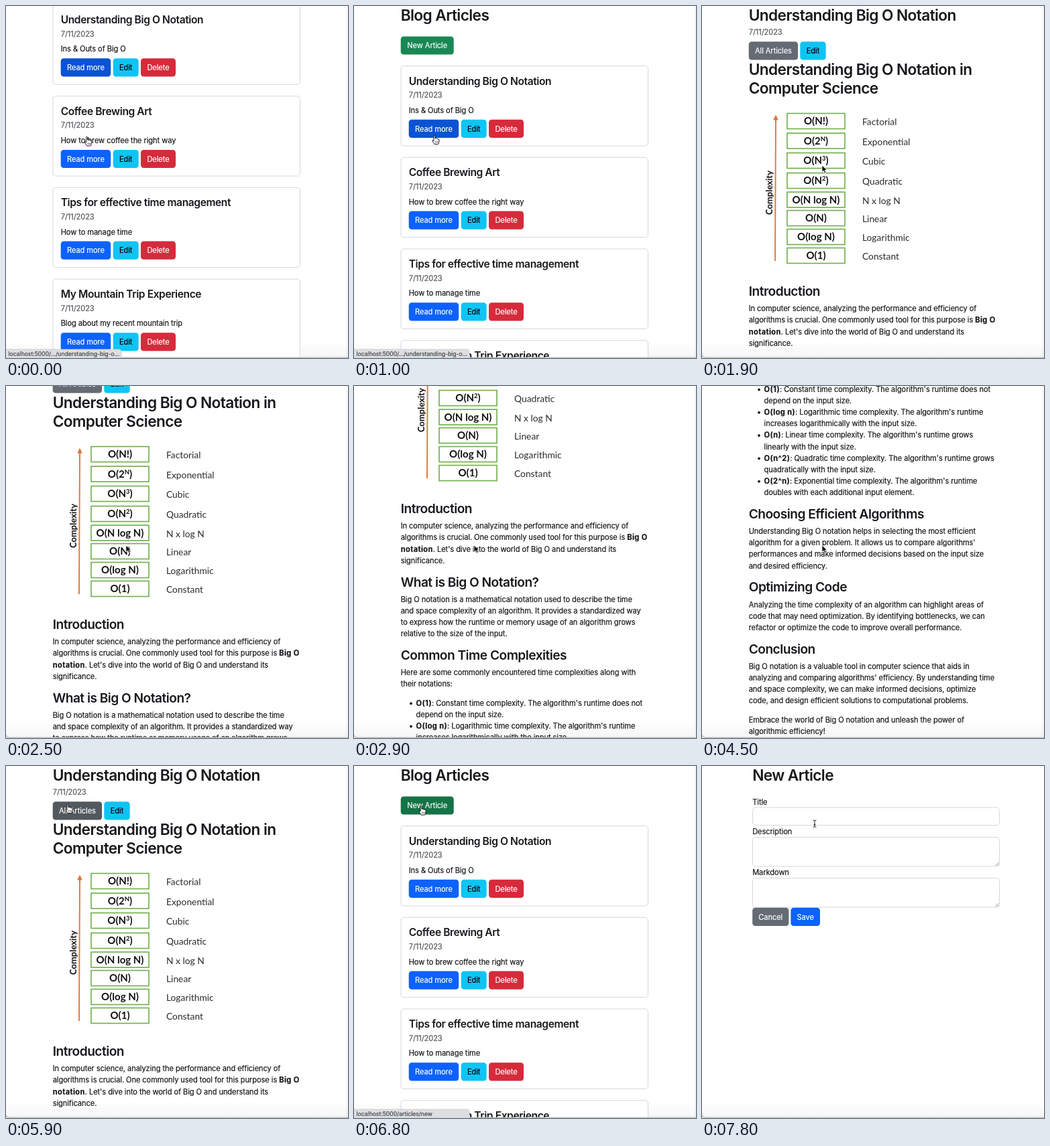
Animation of 510x526 px, one loop 8000 ms. Source, as an HTML page:

```html
<!DOCTYPE html>
<html lang="en">
<head>
<meta charset="utf-8">
<title>Blog demo</title>
<style>
  html, body { margin: 0; width: 100%; height: 100%; overflow: hidden; background: #fff; }
  svg { display: block; width: 100vw; height: 100vh; }
  text {
    --ink: #17191c;
    font: 400 11.09px Inter, "Open Sans", sans-serif; letter-spacing: -.0066em; font-optical-sizing: none;
    fill: var(--ink); stroke: var(--ink); stroke-width: .2px;
  }
  .bold { font-weight: 700; letter-spacing: .035em; }
  .h1, .h2, .h4 { font-weight: 600; letter-spacing: -.027em; stroke: none; }
  .h1 { font-size: 22.7px; }
  .h2 { font-size: 19.15px; }
  .h4 { font-size: 15.6px; }
  .muted { --ink: #54585c; }
  .mid { text-anchor: middle; }
  .box { fill: #fff; stroke: #d5d7da; }
  .fig { --ink: #2b2b2b; font: 400 13.8px Lato, sans-serif; letter-spacing: 0; stroke: none; }
  .figb { --ink: #111; font: 700 15px Lato, sans-serif; letter-spacing: 0; text-anchor: middle; stroke: none; }
  .status { --ink: #3f4347; font-size: 8.6px; letter-spacing: 0; }
</style>
</head>
<body>
<svg id="stage" viewBox="0 0 510 526"></svg>
<script>
const LEFT = 69.7, LINE = 17.15, LOOP = 8000, STEP = 100;
const BLUE = '#0d61fd', CYAN = '#0fc4f3', RED = '#d52b3b', GREY = '#646b73', GREEN = '#198754';

const text = (x, y, s, cls = '') => `<text x="${x}" y="${y}" class="${cls}">${s}</text>`;
const bold = s => s.replace(/\*(.+?)\*/g, '<tspan class="bold">$1</tspan>');
const box = (x, y, w, h) => `<rect class="box" x="${x}" y="${y}" width="${w}" height="${h}" rx="4.3"/>`;
const button = (x, y, w, label, fill, ink = '#fff', id = '') =>
  `<rect id="${id}" x="${x}" y="${y}" width="${w}" height="27.2" rx="4.3" fill="${fill}"/>
   <text x="${x + w / 2}" y="${y + 17.7}" class="mid" style="--ink:${ink}">${label}</text>`;

// Article list
function listPage() {
  const posts = [
    ['Understanding Big O Notation', 'Ins &amp; Outs of Big O'],
    ['Coffee Brewing Art', 'How to brew coffee the right way'],
    ['Tips for effective time management', 'How to manage time'],
    ['My Mountain Trip Experience', 'Blog about my recent mountain trip']
  ];
  const card = ([title, about], i) => {
    const y = 89.6 + 136.7 * i, x = 81.7;
    return box(70, y, 368.5, 119.4) +
      text(x, y + 28, title, 'h4') +
      text(x, y + 47.6, '7/11/2023', 'muted') +
      text(x, y + 70.2, about) +
      button(x, y + 80.2, 74.5, 'Read more', BLUE, '#fff', 'read' + i) +
      button(159.7, y + 80.2, 38, 'Edit', CYAN, '#000') +
      button(201, y + 80.2, 52, 'Delete', RED);
  };
  return text(LEFT, 22.3, 'Blog Articles', 'h1') +
    button(LEFT, 45.4, 79, 'New Article', GREEN, '#fff', 'new') +
    posts.map(card).join('');
}

// Complexity chart
function figure() {
  const sup = n => `<tspan dy="-5" font-size="9.5">${n}</tspan><tspan dy="5">)</tspan>`;
  const rows = [
    [172, 'O(N!)', 'Factorial'], [201.5, 'O(2' + sup('N'), 'Exponential'],
    [231, 'O(N' + sup(3), 'Cubic'], [261, 'O(N' + sup(2), 'Quadratic'],
    [289.5, 'O(N log N)', 'N x log N'], [317, 'O(N)', 'Linear'],
    [345, 'O(log N)', 'Logarithmic'], [373, 'O(1)', 'Constant']
  ];
  return rows.map(([y, label, name]) =>
    `<rect x="127" y="${y - 11.5}" width="86" height="23" fill="#fff" stroke="#76b153" stroke-width="1.7"/>` +
    text(170, y + 5.4, label, 'figb') + text(239, y + 6, name, 'fig')).join('') +
    `<path d="M109 381L110 169" stroke="#e2763a" stroke-width="1.9"/>
     <path d="M110 162.5l3.8 8h-7.6z" fill="#e2763a"/>
     <text class="figb" style="font-size:13px" transform="translate(104.5 279) rotate(-90)">Complexity</text>`;
}

// Article body: "#" heading, "-" list item, otherwise a paragraph; "|" breaks a line
const BODY = [
  '#Introduction',
  'In computer science, analyzing the performance and efficiency of|algorithms is crucial. One commonly used tool for this purpose is *Big O*|*notation*. Let\'s dive into the world of Big O and understand its|significance.',
  '#What is Big O Notation?',
  'Big O notation is a mathematical notation used to describe the time|and space complexity of an algorithm. It provides a standardized way|to express how the runtime or memory usage of an algorithm grows|relative to the size of the input.',
  '#Common Time Complexities',
  'Here are some commonly encountered time complexities along with|their notations:',
  '-*O(1)*: Constant time complexity. The algorithm\'s runtime does not|depend on the input size.',
  '-*O(log n)*: Logarithmic time complexity. The algorithm\'s runtime|increases logarithmically with the input size.',
  '-*O(n)*: Linear time complexity. The algorithm\'s runtime grows|linearly with the input size.',
  '-*O(n^2)*: Quadratic time complexity. The algorithm\'s runtime grows|quadratically with the input size.',
  '-*O(2^n)*: Exponential time complexity. The algorithm\'s runtime|doubles with each additional input element.',
  '#Choosing Efficient Algorithms',
  'Understanding Big O notation helps in selecting the most efficient|algorithm for a given problem. It allows us to compare algorithms\'|performances and make informed decisions based on the input size|and desired efficiency.',
  '#Optimizing Code',
  'Analyzing the time complexity of an algorithm can highlight areas of|code that may need optimization. By identifying bottlenecks, we can|refactor or optimize the code to improve overall performance.',
  '#Conclusion',
  'Big O notation is a valuable tool in computer science that aids in|analyzing and comparing algorithms\' efficiency. By understanding time|and space complexity, we can make informed decisions, optimize|code, and design efficient solutions to computational problems.',
  'Embrace the world of Big O notation and unleash the power of|algorithmic efficiency!'
];

function flow(y) {
  let out = '';
  BODY.forEach((block, i) => {
    if (block[0] === '#') {
      out += text(LEFT, y + 18.9, block.slice(1), 'h2');
      y += 29.4;
      return;
    }
    const item = block[0] === '-';
    if (item) out += `<circle cx="85" cy="${y + 9.2}" r="1.9" fill="#17191c"/>`;
    for (const line of block.slice(item ? 1 : 0).split('|')) {
      out += text(item ? 92.6 : LEFT, y + 12.6, bold(line));
      y += LINE;
    }
    if (!item || BODY[i + 1][0] !== '-') y += 11.43;
  });
  return out;
}

const articlePage = () =>
  text(LEFT, 22.3, 'Understanding Big O Notation', 'h1') +
  text(LEFT, 43.4, '7/11/2023', 'muted') +
  button(LEFT, 53.3, 73.4, 'All Articles', GREY, '#fff', 'all') +
  button(146.3, 53.3, 38.4, 'Edit', CYAN, '#000') +
  text(LEFT, 103.3, 'Understanding Big O Notation in', 'h1') +
  text(LEFT, 131.4, 'Computer Science', 'h1') +
  figure() + flow(414.2);

// New article form
function formPage() {
  const x = 75.2;
  const grip = y => `<path d="M437.5 ${y}l5-5M440.5 ${y}l2-2" stroke="#777" stroke-width=".8"/>`;
  return text(x, 22.3, 'New Article', 'h1') +
    text(x, 57.6, 'Title') + box(75.5, 62, 368, 26.6) +
    text(x, 102, 'Description') + box(75.5, 106.5, 368, 43.5) + grip(149) +
    text(x, 163.3, 'Markdown') + box(75.5, 167.6, 368, 43.5) + grip(210.2) +
    button(x, 211.8, 54.2, 'Cancel', GREY) +
    button(132.4, 211.8, 43.6, 'Save', BLUE);
}

const CURSORS = `
  <path id="arrow" d="M0 0V10.2L2.4 8 4.1 11.8 5.9 11 4.2 7.3H7.4Z" fill="#000" stroke="#fff" stroke-width=".8"/>
  <g id="hand" stroke="#000" stroke-width=".9" stroke-linejoin="round">
    <path fill="#fff" d="M-1 1q0-1.2 1-1.2q1 0 1 1.2v3.6q2.2-.6 2.4.5q1.7-.4 2 .6q1.6-.2 1.6 1.2v2.4q0 2.6-1.6 4.2h-5.2q-1.6-2.2-3-4.6q-.6-1.4.6-1.6q.7 0 1.2 1.2z"/>
    <path fill="none" stroke-width=".6" d="M1.4 9v2.6M3.2 9v2.6M5 9v2.6"/>
  </g>
  <path id="beam" fill="none" stroke="#222" d="M-2.4-5.2Q0-5.2 0-3.6V3.8Q0 5.4-2.4 5.4M2.4-5.2Q0-5.2 0-3.6M0 3.8Q0 5.4 2.4 5.4M-1.4 1.6H1.4"/>`;

document.getElementById('stage').innerHTML = `
  <defs><linearGradient id="shade" x2="0" y2="1">
    <stop stop-color="#fff"/><stop offset="1" stop-color="#f5f5f5"/>
  </linearGradient></defs>
  <rect width="510" height="526" fill="#fff"/>
  <rect y="500" width="510" height="26" fill="url(#shade)"/>
  <g id="list">${listPage()}</g>
  <g id="article">${articlePage()}</g>
  <g id="form">${formPage()}</g>
  <path id="edge" d="M509 0V526" stroke="#e3e3e3"/>
  <path d="M0 521Q.5 525.3 6 525.3H510" fill="none" stroke="#b9b9b9" stroke-width="1.2"/>
  <g id="bubble">
    <path d="M0 513H168.5Q172 513 172 516.5V526H0Z" fill="#dcdee1" stroke="#c6c8cb" stroke-width=".7"/>
    <text id="link" class="status" x="3.5" y="522.7"></text>
  </g>
  <g id="cursor">${CURSORS}</g>`;

const el = id => document.getElementById(id);
const show = (id, on) => el(id).setAttribute('display', on ? 'inline' : 'none');
const move = (id, x, y) => el(id).setAttribute('transform', `translate(${x} ${y})`);
const fill = (id, c) => el(id).setAttribute('fill', c);

// Linear interpolation over [time, value...] keys
function at(keys, t) {
  const i = keys.findIndex(k => k[0] > t);
  if (i === 0) return keys[0].slice(1);
  if (i < 0) return keys[keys.length - 1].slice(1);
  const a = keys[i - 1], b = keys[i], p = (t - a[0]) / (b[0] - a[0]);
  return a.slice(1).map((v, n) => v + (b[n + 1] - v) * p);
}

const listScroll = [[0, 91.6], [100, 89], [300, 70], [600, 22], [800, 4], [900, 0]];
const articleScroll = [
  [2300, 0], [2400, 12], [2500, 70], [2600, 150], [2700, 185], [2800, 185], [2900, 243],
  [3000, 305], [3100, 340], [3200, 340], [3300, 393], [3600, 650], [3700, 700], [3800, 722],
  [4400, 722], [4500, 712], [4700, 420], [4800, 420], [4900, 150], [5000, 0]
];
const pointer = [
  [0, 120.5, 195.5], [900, 120.5, 195.5], [1300, 118, 186], [1600, 148, 212], [1900, 179, 238],
  [5300, 179, 238], [5500, 158, 150], [5700, 112, 42], [5800, 95, 52], [5900, 92, 57],
  [6200, 90, 59], [7100, 105, 60], [7500, 140, 74], [7800, 168, 86]
];

function draw(t) {
  const page = t < 1400 || (t >= 6300 && t < 7200) ? 'list' : t < 6300 ? 'article' : 'form';
  for (const id of ['list', 'article', 'form']) show(id, id === page);
  move('list', 0, -at(listScroll, t)[0]);
  move('article', 0, -at(articleScroll, t)[0]);
  show('edge', page !== 'form');

  fill('read0', t < 1400 ? '#0a53d2' : BLUE);
  fill('all', t >= 5800 ? '#51585e' : GREY);
  fill('new', t >= 6300 ? '#157347' : GREEN);

  show('bubble', t < 1900 || (t >= 6000 && t < 7600));
  el('link').textContent = 'localhost:5000' +
    (t < 1900 ? '/.../understanding-big-o...' : t < 6400 ? '' : '/articles/new');

  const kind = t < 1400 || (t >= 5800 && t < 7200) ? 'hand' : t >= 7400 ? 'beam' : 'arrow';
  for (const id of ['arrow', 'hand', 'beam']) show(id, id === kind);
  move('cursor', ...at(pointer, t));
}

function tick() {
  const t = performance.now() % LOOP;
  draw(Math.floor(t / STEP) * STEP);
  requestAnimationFrame(tick);
}
tick();
</script>
</body>
</html>
```
